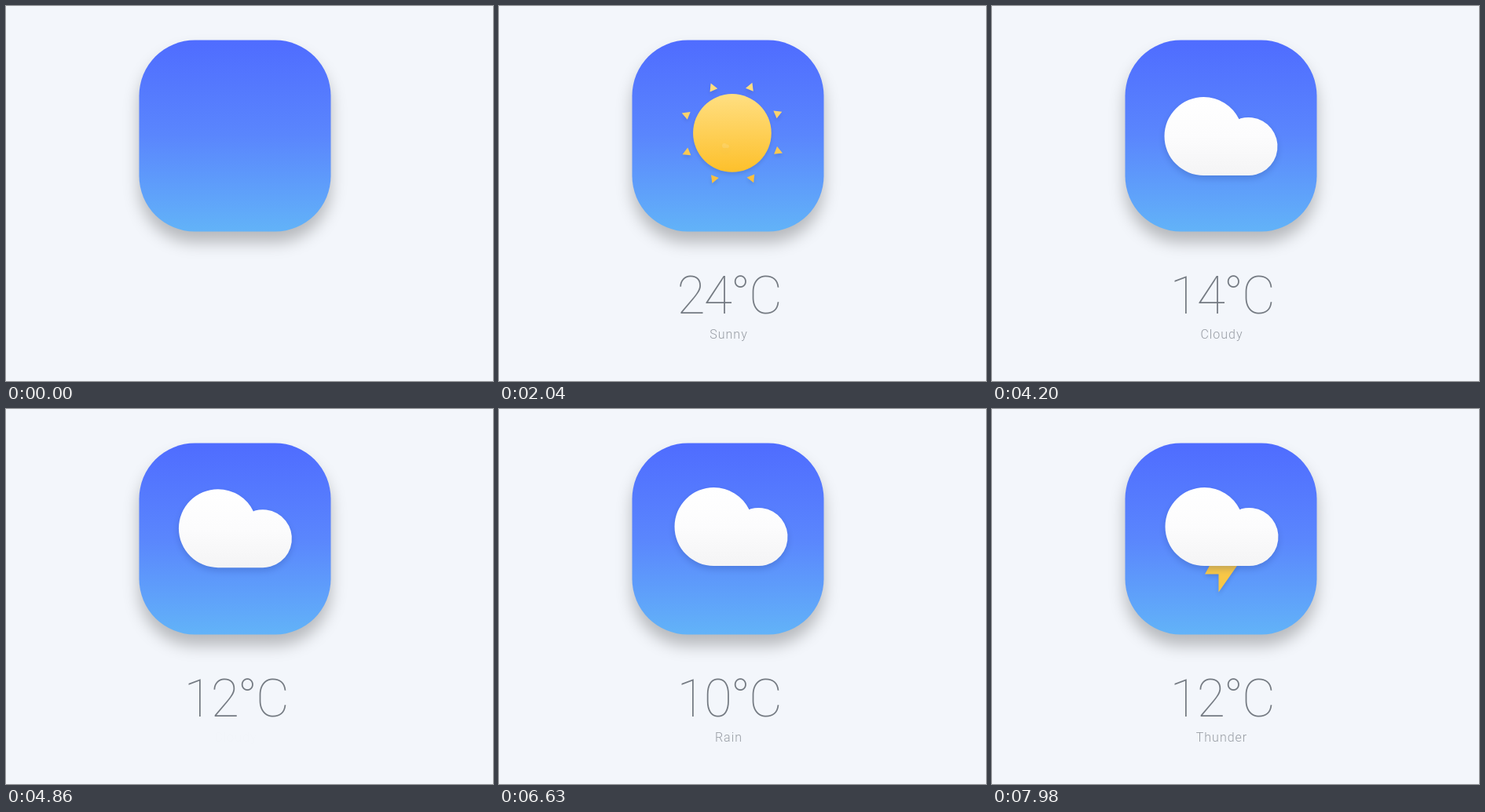
Write an HTML page with a canvas that moves like this. It is 620 px wide and 478 px high and loops after 8 s.

```html
<!DOCTYPE html>
<html lang="en">
<head>
<meta charset="utf-8">
<title>Weather icon</title>
<style>
html, body { margin: 0; width: 100%; height: 100%; overflow: hidden; background: #f3f6fb; }
canvas { display: block; }
</style>
</head>
<body>
<canvas id="stage" width="620" height="478"></canvas>
<script>
const LOOP = 8000;
const ctx = document.getElementById('stage').getContext('2d');

const clamp = v => Math.min(1, Math.max(0, v));
const progress = (t, from, to) => clamp((t - from) / (to - from));
const smooth = p => p * p * (3 - 2 * p);
const mix = (a, b, p) => a + (b - a) * p;
const backOut = p => 1 + 2.2 * (p - 1) ** 3 + 1.2 * (p - 1) ** 2;

// Eased value through [time, value] pairs.
function track(t, keys) {
  let value = keys[0][1];
  for (let i = 1; i < keys.length; i++) {
    value = mix(value, keys[i][1], smooth(progress(t, keys[i - 1][0], keys[i][0])));
  }
  return value;
}

function gradient(top, bottom, ...colors) {
  const fill = ctx.createLinearGradient(0, top, 0, bottom);
  colors.forEach((color, i) => fill.addColorStop(i / (colors.length - 1), color));
  return fill;
}

function shadow(color, offset, blur) {
  ctx.shadowColor = color;
  ctx.shadowOffsetY = offset;
  ctx.shadowBlur = blur;
}

function layer(paint) {
  ctx.save();
  paint();
  ctx.restore();
}

const tile = new Path2D();
tile.roundRect(169.5, 43.5, 244, 244, 71);

const cloud = new Path2D();
cloud.arc(50, 50, 50, Math.PI / 2, Math.PI * 1.5);
cloud.arc(50, 50, 50, -Math.PI / 2, -0.45);
cloud.arc(107, 63, 37, Math.PI + 1.3, Math.PI / 2);
cloud.closePath();

const drop = new Path2D('M0-8C2-4 5-1 5 2.5A5 5 0 0 1-5 2.5C-5-1-2-4 0-8Z');
const bolt = new Path2D('M290 176L271 210.500H288.500V233.500L314 197H298L306 176Z');

function drawTile() {
  layer(() => {
    shadow('rgba(0,0,0,.25)', 14, 20);
    ctx.fillStyle = gradient(43, 288, '#4f6cff', '#5a86fd', '#62b3f8');
    ctx.fill(tile);
  });
}

function drawSun(t) {
  const enter = progress(t, 100, 750);
  const move = smooth(progress(t, 1850, 2500));
  const leave = smooth(progress(t, 3350, 3900));
  const scale = backOut(enter) * mix(1, 0.8, move) * (1 - leave);
  if (enter === 0 || scale <= 0) return;
  const reach = smooth(progress(t, 350, 800));
  const turn = (t - 910) * 19.2 / 1000 * Math.PI / 180;

  layer(() => {
    ctx.translate(mix(mix(292, 315.5, move), 295, leave), mix(mix(166, 146.5, move), 166, leave));
    ctx.scale(scale, scale);
    ctx.fillStyle = gradient(-72, 72, '#ffdf85', '#f8bd3a');
    shadow('rgba(40,60,120,.18)', 3, 5);
    for (let i = 0; i < 8; i++) {
      const angle = turn + i * Math.PI / 4;
      const point = (radius, side) => [
        radius * Math.sin(angle) + side * Math.cos(angle),
        -radius * Math.cos(angle) + side * Math.sin(angle)
      ];
      const base = mix(40, 62, reach);
      ctx.beginPath();
      ctx.moveTo(...point(base + 10, 0));
      ctx.lineTo(...point(base, 5.5));
      ctx.lineTo(...point(base, -5.5));
      ctx.fill();
    }
    ctx.fillStyle = gradient(-52, 52, '#ffdf82', '#fdc02b');
    ctx.beginPath();
    ctx.arc(0, 0, 52, 0, 7);
    ctx.fill();
  });
}

function drawCloud(t) {
  const enter = smooth(progress(t, 1950, 2550));
  if (enter === 0) return;
  const x = track(t, [[2940, 216.5], [4200, 219.5], [5670, 220.5], [6630, 223.5], [7980, 220.5]]);
  const y = track(t, [[3350, 128], [3950, 116], [4400, 116], [5000, 100]]);
  layer(() => {
    ctx.globalAlpha = clamp(enter * 2);
    ctx.translate(x + 72, y + 50);
    ctx.scale(enter, enter);
    ctx.translate(-72, -50);
    shadow('rgba(30,60,140,.25)', 4, 8);
    ctx.fillStyle = gradient(0, 100, '#ffffff', '#fcfcfd', '#f4f4f5');
    ctx.fill(cloud);
  });
}

function drawDrop(t, x, start) {
  const p = progress(t, start, start + 650);
  if (p === 0 || p === 1) return;
  layer(() => {
    ctx.globalAlpha = 0.6 * clamp(p * 2.2) * clamp((1 - p) * 3);
    ctx.translate(x, mix(197, 236, p));
    ctx.fillStyle = '#d3ecff';
    ctx.fill(drop);
  });
}

function drawRain(t) {
  for (let start = 4950; start <= 5700; start += 370) {
    drawDrop(t, 266, start + 0);
    drawDrop(t, 318, start + 180);
  }
}

function drawBolt(t) {
  const p = smooth(progress(t, 7150, 7500));
  if (p === 0) return;
  layer(() => {
    ctx.translate(0, mix(-36, 0, p));
    shadow('rgba(40,60,120,.2)', 3, 5);
    ctx.fillStyle = '#f8c746';
    ctx.fill(bolt);
  });
}

const states = [
  { at: 560, degrees: 24, label: 'Sunny' },
  { at: 2440, degrees: 19, label: 'Partly Cloudy' },
  { at: 3650, degrees: 14, label: 'Cloudy' },
  { at: 4875, degrees: 10, label: 'Rain' },
  { at: 7300, degrees: 12, label: 'Thunder' }
];

function drawText(t) {
  layer(() => {
    ctx.globalAlpha = smooth(progress(t, 450, 950));
    ctx.font = '100 66px Roboto, sans-serif';
    ctx.letterSpacing = '-2px';
    ctx.fillStyle = '#747a82';
    const keys = states.flatMap(({ at, degrees }, i) =>
      i ? [[at - 300, states[i - 1].degrees], [at + 300, degrees]] : [[0, degrees]]);
    ctx.fillText(Math.round(track(t, keys)) + '°C', 226.5, 392);
  });
  states.forEach(({ at, label }, i) => {
    const next = states[i + 1]?.at ?? Infinity;
    if (t < at - 200 || t > next) return;
    layer(() => {
      const fadeIn = i ? progress(t, at, at + 300) : progress(t, 360, 760);
      const fadeOut = i + 1 < states.length ? progress(t, next - 300, next) : 0;
      ctx.globalAlpha = smooth(fadeIn) * (1 - smooth(fadeOut));
      ctx.font = '300 16px Roboto, sans-serif';
      ctx.letterSpacing = '1px';
      ctx.textAlign = 'center';
      ctx.fillStyle = '#989da4';
      ctx.fillText(label, 292.5, 424);
    });
  });
}

function frame(now) {
  const t = now % LOOP;
  ctx.fillStyle = '#f3f6fb';
  ctx.fillRect(0, 0, 620, 478);
  drawTile();
  drawSun(t);
  drawRain(t);
  drawBolt(t);
  drawCloud(t);
  drawText(t);
  requestAnimationFrame(frame);
}
requestAnimationFrame(frame);
</script>
</body>
</html>
```
